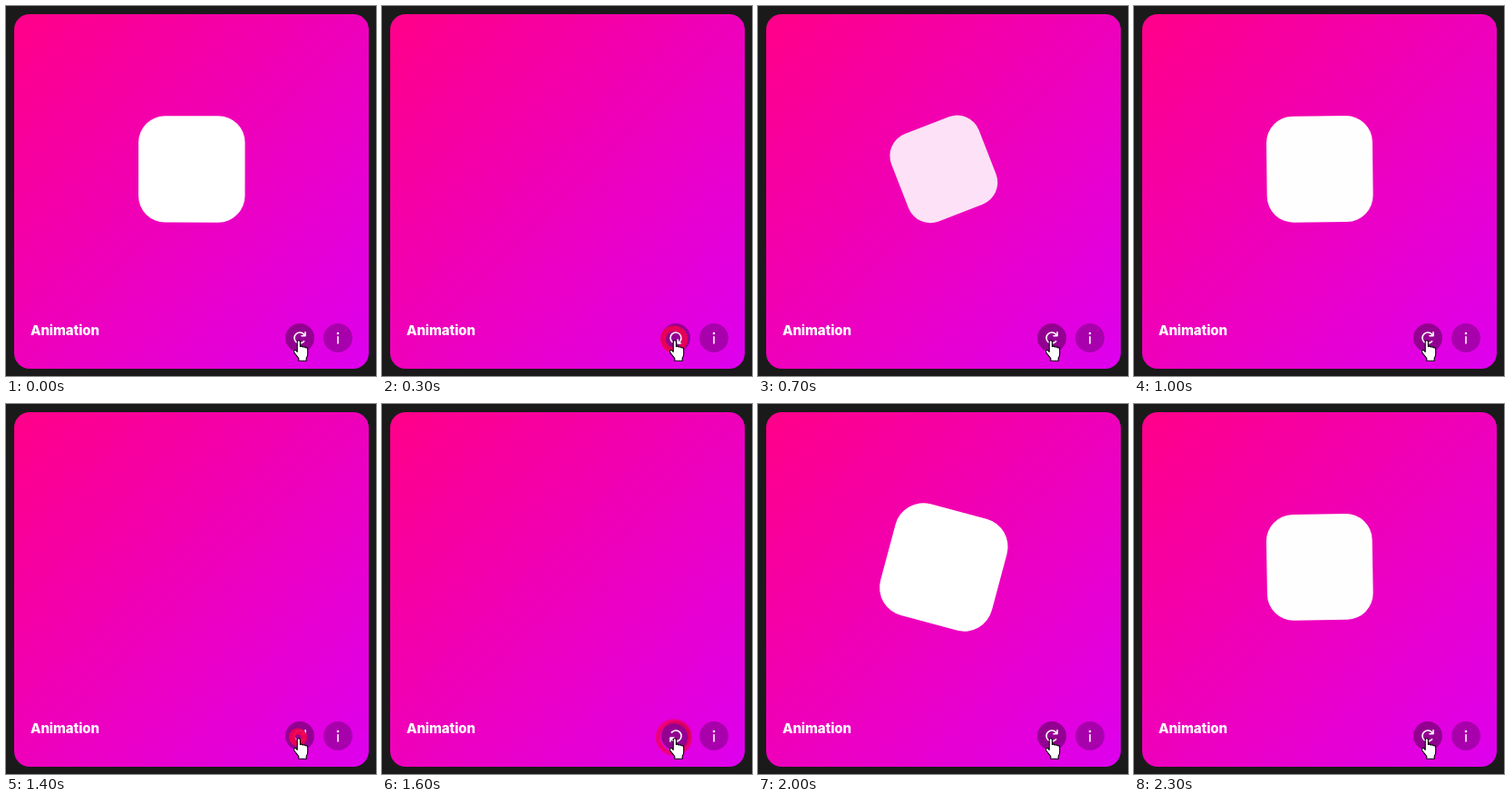
Animation of 408x408 px, one loop 2.4 s. Source, as an HTML page:

```html
<!DOCTYPE html>
<html lang="en">
<head>
<meta charset="utf-8">
<title>Animation</title>
<style>
  html, body { margin: 0; width: 100%; height: 100%; overflow: hidden; background: #1a1a1a; }
  svg { display: block; width: 100%; height: 100%; }
  text { font: 800 15px Inter, Roboto, sans-serif; letter-spacing: -.1px; fill: #fff; }
  .line { fill: none; stroke: #fff; stroke-width: 1.6; stroke-linecap: round; stroke-linejoin: round; }
</style>
</head>
<body>
<svg viewBox="0 0 408 408">
  <linearGradient id="pink" x2="1" y2="1">
    <stop stop-color="#ff0088"/>
    <stop offset="1" stop-color="#dd00ee"/>
  </linearGradient>
  <rect x="9" y="9" width="391" height="391" rx="17" fill="url(#pink)"/>
  <rect id="box" x="-58.7" y="-58.7" width="117.4" height="117.4" rx="29.3" fill="#fff"/>
  <text x="27" y="362.5">Animation</text>

  <circle cx="324" cy="366" r="16" opacity=".35"/>
  <circle cx="366" cy="366" r="16" opacity=".25"/>
  <g id="reload" class="line">
    <path d="M4.6 3.8A6 6 0 1 1 5 -3.3M6 -6.2V-2.2H2"/>
  </g>
  <path class="line" d="M366 364.8V372"/>
  <circle cx="366" cy="361" r="1.3" fill="#fff"/>

  <circle id="ripple" cx="322" cy="367.5" fill="none" stroke="#f00050"/>
  <path id="hand" fill="#fff" stroke="#000" stroke-width="1.1" stroke-linejoin="round"
    d="M321.2 370.5Q321.2 368.8 322.8 368.8T324.4 370.5V375.6Q325.8 374.4 327.3 376.1
       Q328.9 375.1 330 376.8Q332.7 376.2 332.7 379V384Q332.7 386.5 331.2 388.2V391.2H322.8V388.6
       L317.9 382.3Q316.8 380.4 318.4 379.6Q319.6 379.2 321.2 381.3Z"/>
</svg>
<script>
const LOOP = 2400, PERIOD = 1200, CLICK = 200, ENTER = 356;
const [box, reload, ripple] = ['box', 'reload', 'ripple'].map(id => document.getElementById(id));

// Underdamped spring from 0 to 1: stiffness 260, damping 20, mass 1.
function spring(ms) {
  const t = Math.max(0, ms) / 1000, w = Math.sqrt(160);
  return 1 - Math.exp(-10 * t) * (Math.cos(w * t) + 10 / w * Math.sin(w * t));
}

function draw(now) {
  const time = now % LOOP;
  const t = time < CLICK ? PERIOD : (time - CLICK) % PERIOD;  // since the last click

  const p = spring(t - ENTER);
  box.setAttribute('transform', `translate(204.8 179.9) rotate(${180 * p}) scale(${p})`);
  box.setAttribute('opacity', Math.min(1, p));

  const turn = Math.min(1, t / 400);
  reload.setAttribute('transform', `translate(324 366) rotate(${360 * turn})`);

  const grow = Math.min(1, t / 400);
  ripple.setAttribute('r', 6.5 + 22 * grow);
  ripple.setAttribute('stroke-width', 7 - 4 * grow);
  ripple.setAttribute('opacity', .95 * (1 - grow ** 2));

  requestAnimationFrame(draw);
}
requestAnimationFrame(draw);
</script>
</body>
</html>
```
